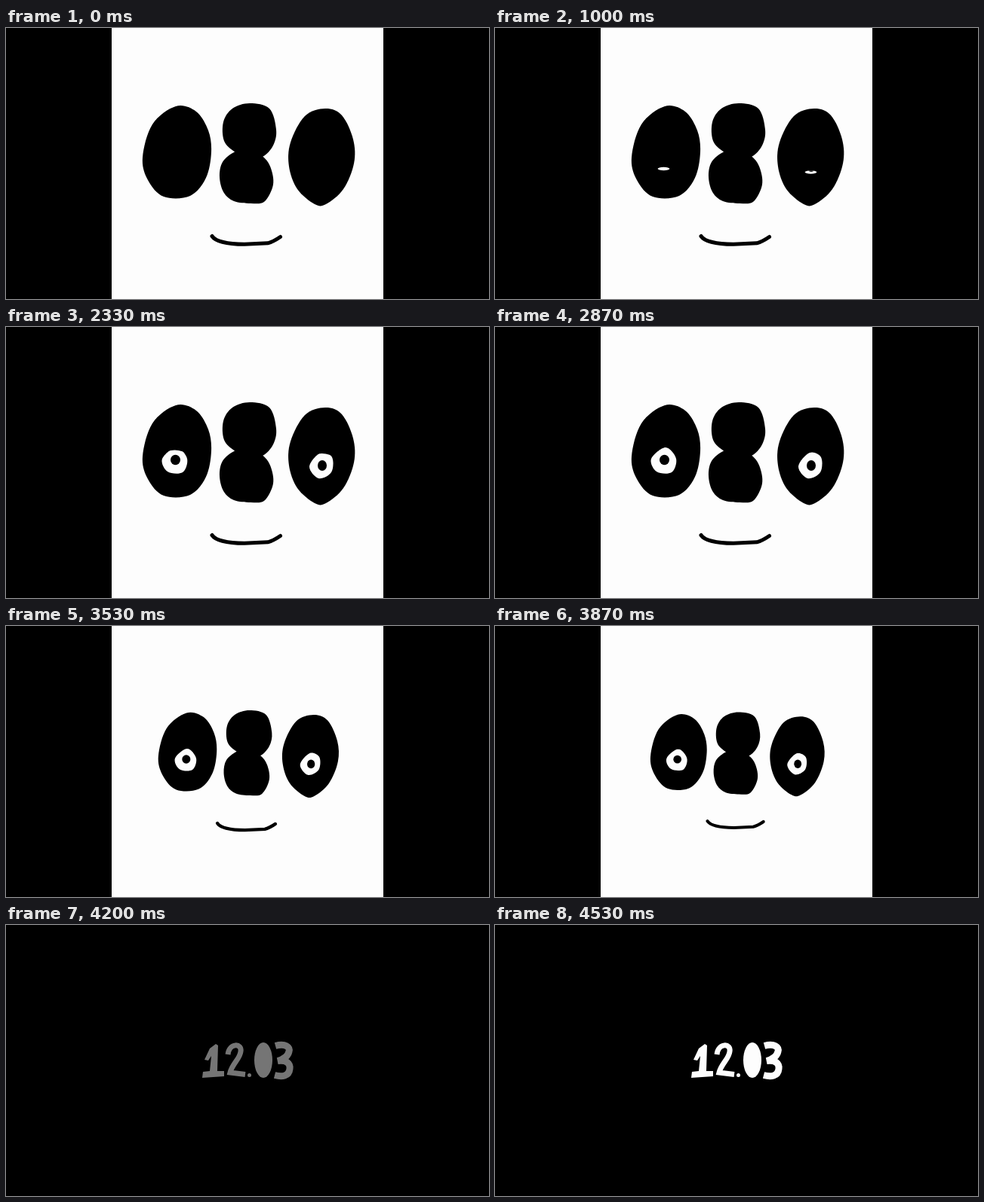
Write an HTML page that moves like this. It is 640x360 px and loops after 9.54 s.

```html
<!DOCTYPE html>
<html lang="en">
<head>
<meta charset="utf-8">
<title>Face and date</title>
<style>
  html, body { margin: 0; width: 100%; height: 100%; overflow: hidden; background: #000; }
  svg { display: block; width: 100%; height: 100%; }
  .paper, .ring, #date { fill: #fdfdfd; }
  .mouth { fill: none; stroke: #000; stroke-width: 5; stroke-linecap: round; }
  .stroke { fill: none; stroke: #fdfdfd; }
</style>
</head>
<body>
<svg viewBox="0 0 640 360">
  <defs>
    <clipPath id="square"><rect x="140" width="360" height="360"/></clipPath>
    <clipPath id="lidL"><ellipse class="lid" cx="223.5" cy="187"/></clipPath>
    <clipPath id="lidR"><ellipse class="lid" cx="418.5" cy="191.5"/></clipPath>
  </defs>
  <g clip-path="url(#square)">
    <rect class="paper" x="140" width="360" height="360"/>
    <g id="face">
      <!-- eye patches -->
      <path data-pts="225,104 252,111 268,136 272,165 265,199 244,223 209,224 188,202 181,172 194,128"/>
      <path data-pts="423,107 445,116 460,148 461,180 447,214 424,234 409,234 386,214 375,184 377,152 396,117"/>
      <!-- nose: two overlapping blobs -->
      <path data-pts="323,100 349,107 358,135 354,156 340,171 320,174 303,164.5 289,150 288,125 300,107"/>
      <path data-pts="303,164.5 320,160 340,170.5 350.5,185 354,208 342.5,230.5 324,233 302,230 288.5,218.5 283,198 287,178"/>
      <path class="mouth" d="M273 276.5 Q280 287 316 287.3 L347 285.8 Q354 284 363.5 277.5"/>
      <g clip-path="url(#lidL)">
        <path class="ring" data-pts="226,160 240,175 234,193 214,192 207,175"/>
        <ellipse cx="224.5" cy="176.5" rx="6.5" ry="6.7"/>
      </g>
      <g clip-path="url(#lidR)">
        <path class="ring" data-pts="417,167 432,173 431,193 414,201 402,185"/>
        <ellipse cx="419" cy="184" rx="6" ry="7"/>
      </g>
    </g>
  </g>
  <g id="date" role="img" aria-label="12.03" opacity="0">
    <path d="M263 179 L270 164 L278 158 L281 160 L280 194 H289 V201 L260 203 L261 195 L270 194 L272 174 L268 180 Z"/>
    <path class="stroke" stroke-width="7" d="M294 172 C296 156 313 157 311 168 C310 178 300 184 297 196 L317 198.5"/>
    <circle cx="322.5" cy="199.5" r="2.5"/>
    <ellipse cx="341" cy="179.5" rx="12" ry="23.5"/>
    <path class="stroke" stroke-width="9" d="M357 160.5 C370 157 377 162 375 168 Q373 177 360 180.5 C372 179 377 184 376 191 C375 201 366 202 356 199.5"/>
  </g>
</svg>
<script>
const LOOP = 9540, FPS = 15;
const face = document.getElementById('face');
const date = document.getElementById('date');
const lids = document.querySelectorAll('.lid');

// Smooth closed curve through a few key points
function blob(pts, k = 1 / 6) {
  const at = i => pts[(i + pts.length) % pts.length];
  let d = 'M' + pts[0];
  pts.forEach((p, i) => {
    const a = at(i - 1), q = at(i + 1), b = at(i + 2);
    d += `C${p[0] + (q[0] - a[0]) * k},${p[1] + (q[1] - a[1]) * k} ` +
         `${q[0] - (b[0] - p[0]) * k},${q[1] - (b[1] - p[1]) * k} ${q}`;
  });
  return d + 'Z';
}

document.querySelectorAll('[data-pts]').forEach(path => {
  const pts = path.dataset.pts.split(' ').map(s => s.split(',').map(Number));
  path.setAttribute('d', blob(pts));
});

const clamp = x => Math.min(1, Math.max(0, x));
const ease = (n, from, to) => (1 - Math.cos(Math.PI * clamp((n - from) / (to - from)))) / 2;

// All moments below are counted in steps of 1/15 s
function openness(n) {
  if (n < 15) return 0;
  if (n < 34) return ease(n, 13, 24);
  return n < 38 ? 1 - ease(n, 34, 38) : ease(n, 38, 43);
}

function zoom(n) {
  if (n <= 57) return 1 - 0.2 * ease(n, 47, 56);
  return Math.min(40, 0.8 + 0.02 * (n - 57) ** 4.44);
}

function draw(now) {
  const n = Math.floor((now % LOOP + 5) * FPS / 1000);
  const open = openness(n);
  lids.forEach(lid => {
    lid.setAttribute('rx', open ? 6 + 24 * open : 0);
    lid.setAttribute('ry', 27.5 * open);
  });
  face.setAttribute('transform', `translate(320 180) scale(${zoom(n)}) translate(-320 -180)`);
  date.setAttribute('opacity', clamp((n - 58.7) / 9.3));
}

const start = performance.now();
function tick() {
  draw(performance.now() - start);
  requestAnimationFrame(tick);
}
tick();
</script>
</body>
</html>
```
